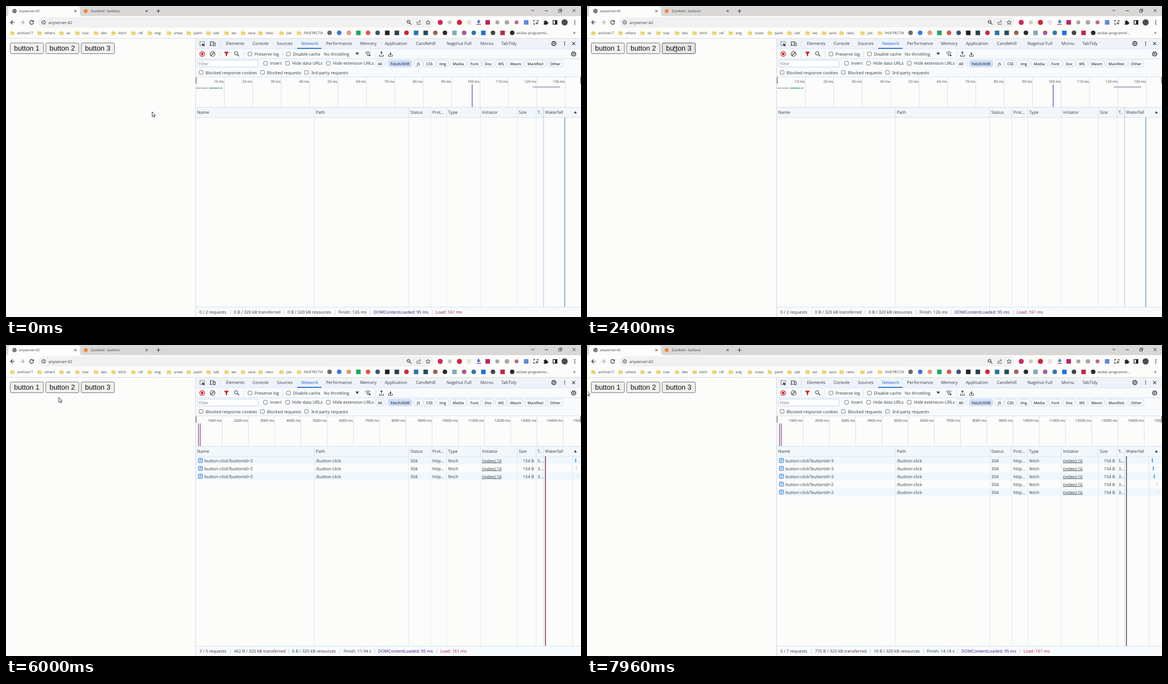
An HTML page for the animation above (8000 ms loop, 1017 px wide and 551 px high).

```html
<!DOCTYPE html>
<html lang="en">
<head>
<meta charset="utf-8">
<title>Network panel</title>
<style>
html, body { margin: 0; width: 100%; height: 100%; overflow: hidden; background: #fcfcfb; }
svg { display: block; width: 100%; height: 100%; }
text { font-family: "Open Sans", "Noto Sans", sans-serif; text-rendering: geometricPrecision; white-space: pre; }
.btn text { font-family: "Liberation Sans", Arial, sans-serif; }
.btn rect { fill: #efefed; stroke: #7b7b7b; animation: 8s step-end infinite; }
#b1 rect { animation-name: hover1; }
#b2 rect { animation-name: hover2; }
#b3 rect { animation-name: hover3; }
@keyframes hover1 { 98.1% { fill: #e4e4e2; stroke: #555; } 99.3% { fill: #efefed; stroke: #7b7b7b; } }
@keyframes hover2 { 76.4% { fill: #e4e4e2; stroke: #555; } 98% { fill: #efefed; stroke: #7b7b7b; } }
@keyframes hover3 { 28.9% { fill: #e4e4e2; stroke: #555; } 74.1% { fill: #efefed; stroke: #7b7b7b; } }

.stage { visibility: hidden; animation: 8s step-end infinite; }
#s0 { animation-name: show0; }
#s1 { animation-name: show1; }
#s2 { animation-name: show2; }
#s3 { animation-name: show3; }
#s4 { animation-name: show4; }
#s5 { animation-name: show5; }
@keyframes show0 { 0% { visibility: visible; } 53% { visibility: hidden; } }
@keyframes show1 { 53% { visibility: visible; } 59.25% { visibility: hidden; } }
@keyframes show2 { 59.25% { visibility: visible; } 65.5% { visibility: hidden; } }
@keyframes show3 { 65.5% { visibility: visible; } 86.25% { visibility: hidden; } }
@keyframes show4 { 86.25% { visibility: visible; } 93.25% { visibility: hidden; } }
@keyframes show5 { 93.25%, 100% { visibility: visible; } }

#cursor { animation: move 8s linear infinite; }
@keyframes move {
  0% { transform: translate(258px, 187px); }
  17.875% { transform: translate(258px, 187px); animation-timing-function: ease-in-out; }
  21.625% { transform: translate(197px, 134px); }
  24.125% { transform: translate(197px, 134px); animation-timing-function: ease-in-out; }
  30%, 72.875% { transform: translate(153.5px, 71.5px); }
  75% { transform: translate(93px, 92.5px); }
  77.875%, 97.5% { transform: translate(92px, 76.5px); }
  99.5%, 100% { transform: translate(-1px, 80.5px); }
}
</style>
</head>
<body>
<svg id="view" viewBox="0 0 1017 551"></svg>
<script>
const INK = '#3a3a3c', LINE = '#d3e2f5';

const rect = (x, y, w, h, fill, more = '') =>
  `<rect x="${x}" y="${y}" width="${w}" height="${h}" fill="${fill}" ${more}/>`;
const dot = (x, y, r, fill, more = '') =>
  `<circle cx="${x}" cy="${y}" r="${r}" fill="${fill}" ${more}/>`;
const path = (d, stroke = INK, w = 1, fill = 'none') =>
  `<path d="${d}" stroke="${stroke}" stroke-width="${w}" fill="${fill}"/>`;
const solid = (d, fill = INK) => `<path d="${d}" fill="${fill}"/>`;
const text = (x, y, str, size = 7.6, fill = INK, more = '') =>
  `<text x="${x}" y="${y}" font-size="${size}" fill="${fill}" ${more}>${str}</text>`;
const vline = (x, y1, y2, color = LINE, w = 1) => path(`M${x} ${y1}V${y2}`, color, w);
const hline = (y, x1, x2, color = LINE, w = 1) => path(`M${x1} ${y}H${x2}`, color, w);
const cross = (x, y, r, w = 1) =>
  path(`M${x - r} ${y - r}l${2 * r} ${2 * r}m0 ${-2 * r}l${-2 * r} ${2 * r}`, INK, w);
const ring = (x, y, r, color = INK, w = 1) => dot(x, y, r, 'none', `stroke="${color}" stroke-width="${w}"`);
const kebab = (x, y, step) => [-step, 0, step].map(d => dot(x, y + d, .9, INK)).join('');
const check = (x, y, label) =>
  rect(x - 3.3, y - 3.3, 6.6, 6.6, '#fff', 'rx="1.2" stroke="#6b6b6e" stroke-width=".9"') +
  text(x + 8, y + 2.8, label);
const gear = (x, y) => ring(x, y, 3.2, INK, 1.2) + dot(x, y, 1.2, INK) +
  dot(x, y, 4.2, 'none', `stroke="${INK}" stroke-width="1.1" stroke-dasharray="1.6 1.7"`);
const lens = (x, y, r) => ring(x - 1, y - 1, r) + path(`M${x + r - 1.6} ${y + r - 1.6}l2.8 2.8`, INK, 1.2);
const arrowBox = (x, y, up) =>
  path(`M${x} ${y + 2}v-5.5M${x - 3.5} ${y + 1.5}v2.5h7v-2.5`) +
  solid(up ? `M${x - 2.3} ${y - 2}l2.3-2.8 2.3 2.8z` : `M${x - 2.3} ${y - .4}l2.3 2.8 2.3-2.8z`);

function tabStrip() {
  const title = (x, label) => text(x, 11.3, label, 6.1);
  return rect(0, 0, 1017, 18, '#dad8d6') +
    solid('M0 18q4 0 4-4V5q0-4 4-4H127q4 0 4 4V14q0 4 4 4z', '#fcfcfb') +
    dot(15, 9, 3.7, '#5b5d60') + path('M12 8h3l1 2h2M14 12v-2', '#d8d8d8', .8) +
    title(23, 'anyserver:42') + cross(122.7, 9, 2) +
    dot(141, 9, 3.6, '#ee8a3c') + title(150, 'Zumbrel - buttons') + cross(248.7, 9, 2) +
    path('M266.3 9h6.6M269.6 5.7v6.6', INK, 1.1) +
    path('M929 6.5l2.7 2.7 2.7-2.7') + hline(8.5, 953, 958.5, INK) +
    path('M977.5 7h4v4h-4zM979 7V5.5h4V9.5h-1.5', INK, .9) + cross(1004.7, 8, 2.6);
}

function addressBar() {
  const logos = [[768, '#d6245a', 4.5], [785, '#c9cdc4', 3.5], [802, '#cf2432', 4.5], [869, '#a3a69b', 3.5],
    [886, '#a9a9a4', 4], [903, '#b56a92', 3.5], [988, '#4c4c4e', 5.5]];
  const squares = [[819, '#e9e6e0'], [852, '#bd2560'], [920, '#5a8be6']];
  return path('M15.5 29H8.5M11.8 25.5L8.3 29l3.5 3.5', INK, 1.2) +
    path('M25 29h7M28.7 25.5l3.5 3.5-3.5 3.5', '#a9a9a9', 1.1) +
    path('M47.6 26.6a3.4 3.4 0 1 0 1 3', INK, 1.2) + solid('M49.3 25v3.6h-3.6z') +
    rect(57, 20, 699, 18, '#f0f1f0', 'rx="9"') +
    ring(66.6, 29, 3.2) + path('M66.6 28.5v2.2M66.6 26.8v.9') +
    text(75, 31.7, 'anyserver:42', 7) +
    lens(713, 29, 2.7) + path('M710.5 28h3', INK, .8) +
    path('M727 27.5v5h6v-2M728.5 30.5q.5-3.5 4-3.5M731 25l2.3 2-2.3 2', '#5d5d60', .9) +
    path('M746.6 25.3l1.1 2.5 2.7.3-2 1.8.6 2.7-2.4-1.4-2.4 1.4.6-2.7-2-1.8 2.7-.3z', INK, .9) +
    logos.map(([x, c, r]) => dot(x, 29, r, c)).join('') +
    squares.map(([x, c]) => rect(x - 4, 25, 8, 8, c)).join('') +
    solid('M834.6 24.5h2.8v3h2.3l-3.7 3.6-3.7-3.6h2.3z', '#2c6fd6') + hline(32.5, 832, 840, '#d0394a', 1.3) +
    path('M933.5 28v-2.5h2.5M938.5 25.5h2.5V28M933.5 30v2.5h2.5', INK, 1.1) + path('M939 28v5M936.5 30.5h5', INK, 1.1) +
    solid('M951 27h2v-.6a1.2 1.2 0 0 1 2.4 0V27h2v2h.6a1.2 1.2 0 0 1 0 2.4h-.6V33h-6.4v-2a1.2 1.2 0 0 0 0-2.4z', '#222') +
    rect(967.5, 25.7, 7, 6.6, 'none', 'stroke="#222" stroke-width="1.2"') + rect(971, 25.7, 3.5, 6.6, '#222') +
    kebab(1006, 29, 3);
}

function bookmarks() {
  const folders = [[20, 'archive17'], [68, 'others'], [107, 'se'], [135, 'trav'], [168, 'dev'], [199, 'kitch'],
    [234, 'ref'], [263, 'eng'], [297, 'snow'], [332, 'paint'], [367, 'tatt'], [399, 'wo'], [428, 'хата'],
    [459, 'reloc'], [496, 'job'], [527, 'РАЗГРЕСТИ']];
  const round = { 0: '#6a6a6a', 1: '#3b78de', 2: '#e39a76', 4: '#dd5648', 5: '#36546d', 8: '#c9243d', 11: '#9b6259',
    12: '#2b2b2d', 14: '#a85c90', 15: '#3574b0', 17: '#444', 19: '#2b2b2d' };
  const square = { 3: '#1ca566', 6: '#1f1f20', 7: '#23434a', 9: '#2374b4', 10: '#214d58', 13: '#7fabb6',
    16: '#2470dc', 18: '#bd2947' };
  let out = folders.map(([x, label]) =>
    solid(`M${x - 12} 44.6h2.6l.8.9h3.2v5.3h-6.6z`, '#f4d673') +
    path(`M${x - 12} 46.5h6.6v4.3h-6.6z`, '#e3bb49', .6) + text(x, 49.8, label, 6.2)).join('');
  for (let i = 0; i < 20; i++) {
    const x = 572.3 + 17 * i;
    out += round[i] ? dot(x, 47.6, 4, round[i]) : rect(x - 4, 43.6, 8, 8, square[i]);
  }
  return out + text(903, 49.8, 'wicker-programmi...', 6.2) + text(1003, 50, '»', 9) + hline(57.5, 0, 1017, '#dededb');
}

function toolTabs() {
  const tabs = [[389, 'Elements'], [436, 'Console'], [479, 'Sources'], [522, 'Network'], [566, 'Performance'],
    [626, 'Memory'], [670, 'Application'], [725, 'Candlehill'], [779, 'Nagshut Full'], [839, 'Morvu'], [876, 'TabTidy']];
  return rect(336, 58, 681, 18, '#eef3f9') + hline(76, 336, 1017) +
    rect(343, 63, 8, 7, 'none', `stroke="${INK}" stroke-dasharray="1.4 1"`) + solid('M346.5 66l5 2-2 .8 2 2-1 1-2-2-.8 1.6z') +
    path('M361.5 69.5V63.5h7M360 69.8h5M366.5 65.5h3.5v4.8h-3.5z', INK, 1.1) + vline(379, 61, 73) +
    tabs.map(([x, label]) => text(x, 69.4, label, 7.6, label === 'Network' ? '#1c63cf' : INK)).join('') +
    rect(515, 74.2, 43, 1.8, '#2a6fd8') +
    gear(969, 66.5) + kebab(988, 66.5, 2.8) + cross(1004, 66.5, 2.6, 1.1);
}

function toolRow() {
  return rect(336, 76.5, 681, 49, '#f8fafc') + hline(93.5, 336, 1017) +
    ring(347, 85, 4.2, '#c9252d', 1.2) + rect(345, 83, 4, 4, '#c9252d') +
    ring(365.3, 85, 4.2, INK, 1.1) + path('M362.3 88l6-6', INK, 1.1) + vline(379, 79, 91) +
    solid('M385.6 81h8.6l-3.2 4.2V89.6l-2.2-1.6v-2.8z', '#c9252d') + lens(408, 84.8, 3) + vline(421, 79, 91) +
    check(431.5, 85, 'Preserve log') + vline(489, 79, 91) + check(499.5, 85, 'Disable cache') +
    text(562, 87.8, 'No throttling') + solid('M618 82.6h6.4l-3.2 4.2z') +
    path('M635 83.2q4.8-4 9.6 0M636.8 85.2q3-2.4 6 0') + dot(639.6, 87, 1, INK) + gear(642.5, 87.2).slice(0, 0) +
    dot(643, 87.5, 1.5, INK) + vline(654, 79, 91) +
    arrowBox(664, 85, true) + arrowBox(680, 85, false) + gear(1004, 85);
}

function filterRow() {
  const pills = [[654, 669, 'All'], [676, 718, 'Fetch/XHR'], [722, 737, 'JS'], [739, 759, 'CSS'], [762, 783, 'Img'],
    [786, 814, 'Media'], [817, 840, 'Font'], [843, 863, 'Doc'], [866, 885, 'WS'], [888, 915, 'Wasm'],
    [918, 955, 'Manifest'], [958, 985, 'Other']];
  return rect(338.5, 96, 107.5, 12, '#fff', 'rx="2" stroke="#c8d6e8"') + text(341, 104.8, 'Filter', 7.4, '#77777a') +
    check(459, 101.5, 'Invert') + check(498, 101.5, 'Hide data URLs') + check(570, 101.5, 'Hide extension URLs') +
    vline(672.5, 96, 108) +
    pills.map(([a, b, label], i) =>
      rect(a, 96, b - a, 12, i === 1 ? '#cbdff8' : '#fbfcfd', `rx="3.5" stroke="${i === 1 ? '#cbdff8' : '#c5d5e8'}" stroke-width=".9"`) +
      text((a + b) / 2, 104.6, label, 6.7, INK, 'font-weight="600" text-anchor="middle"')).join('') +
    check(345, 117.7, 'Blocked response cookies') + check(453.5, 117.7, 'Blocked requests') +
    check(531.5, 117.7, '3rd-party requests') + hline(125.5, 336, 1017);
}

const COLS = [[338, 'Name'], [548, 'Path'], [715, 'Status'], [754, 'Prot...'], [782, 'Type'], [842, 'Initiator'],
  [907, 'Size'], [940, 'T..'], [953.5, 'Waterfall']];

function tableFrame() {
  return rect(336, 180, 681, 17, '#f2f7fb') + hline(179.5, 336, 1017) + hline(197.5, 336, 1017) +
    COLS.map(([x, label]) => text(x, 191.2, label, 7.6)).join('') + solid('M1004.4 190.3h5.2l-2.6-4z') +
    rect(336, 534, 681, 17, '#f8fafc') + hline(533.5, 336, 1017) + vline(335.5, 58, 551, '#d6d9dd');
}

const DONE = [10.94, 11.44, 11.94, 13.6, 14.18];  // finish time of each request, s

function ruler(n) {
  const step = n === 0 ? 50.25 : n < 3 ? 57.95 : 46.4;
  let out = '';
  for (let i = 1; i < 16 && 336 + step * (i - 1) < 1000; i++) {
    const x = 336 + step * i;
    out += vline(x, 126, 179) + text(x - 1, 135.6, `${i * (n ? 1000 : 10)} ms`, 6.2, INK, 'text-anchor="end"');
  }
  out += rect(335.6, 126, 1.6, 11.5, '#85878b') + rect(1015.6, 126, 1.4, 11.5, '#85878b');
  if (!n) {
    return out + hline(145.5, 336, 344, '#98a0a4', 1.5) + hline(145.5, 345, 357, '#9ba58c', 1.5) +
      hline(145.5, 359, 377, '#46b083', 1.6) + hline(145.5, 378, 383, '#4fa7a5', 1.5) +
      vline(824.5, 139, 179, '#6863bd', 1.4) + hline(143.5, 931.5, 980, '#9492b4', 1.5);
  }
  const ticks = DONE.slice(0, n).map(s => vline(336 + s * step, 146, 149.5, '#d5e6ea')).join('');
  return out + ticks + vline(336 + .095 * step, 139, 179, '#6a5aa6', 1.2) + vline(336 + .161 * step, 139, 179, '#93415f', 1.2);
}

function rows(n) {
  let back = '', front = '';
  for (let i = 0; i < n; i++) {
    const y = 204.7 + 14 * i, base = y + 2.8;
    if (i % 2 === 0) back += rect(336, y - 7, 681, 14, '#f1f8fd');
    const cells = [`button-click?buttonId=${i < 3 ? 3 : 2}`, '/button-click', '304', 'http...', 'fetch'];
    front += rect(340.4, y - 3.6, 7, 7.2, '#fff', 'rx="1" stroke="#3b7ddd" stroke-width="1.1"') +
      path(`M342 ${y - 1.5}h4m-4 1.7h4m-4 1.7h2.6`, '#3b7ddd', .8) +
      cells.map((c, k) => text(k ? COLS[k][0] : 351, base, c, 7.7)).join('') +
      text(842, base, '(index):16', 7.6, INK, 'text-decoration="underline"') +
      text(934, base, '154 B', 7.6, INK, 'text-anchor="end"') + text(940, base, i ? '3...' : '5...');
    const age = DONE[n - 1] - DONE[i], x = 1011 - 3.4 * age;
    front += vline(x - 2.3, y - 1.5, y + 1.5, '#cddde2') +
      (age > .8 ? vline(x, y - 3.6, y + 3.6, '#36abd9', 1.8)
        : vline(x, y - (age ? 3.4 : 1.5), y + (age ? 3.4 : 1.5), '#a9d3df'));
  }
  const grid = [545.5, 712.5, 751, 779.5, 839, 904.5, 937.5].map(x =>
    vline(x, 180, 197) + vline(x, 197, 533, '#dfe8f0', .9)).join('');
  const marks = n === 0
    ? vline(950.8, 180, 533, '#b2d2f1', 1.2) + vline(988.3, 197, 533, '#74a5bd', 1.5)
    : vline(951, 180, 533, '#d0dfef') + vline(n < 3 ? 1004 : n < 4 ? 1002 : 994, 197, 533, '#d5e6f2') +
      vline(954.2, 197, 533, n < 5 ? '#7b3a61' : '#5d4766', 1.5);
  return back + grid + marks + front;
}

function status(n) {
  const finish = n ? DONE[n - 1].toFixed(2) + ' s' : '126 ms';
  const xs = n === 0 ? [342, 403, 498, 588, 650, 760]
    : n < 5 ? [342, 403, 506, 597, 658, 768] : [342, 403, 507, 601, 662, 772];
  const parts = [`${n} / ${n + 2} requests`, `${154 * n} B / 320 kB transferred`, `${2 * n} B / 320 kB resources`,
    `Finish: ${finish}`, 'DOMContentLoaded: 95 ms', 'Load: 161 ms'];
  const colors = { 4: '#35207f', 5: n ? '#b0203c' : '#85204f' };
  return parts.map((p, i) => (i ? vline(xs[i] - 6, 538, 547, '#ccd6e2') : '') +
    text(xs[i], 545.4, p, 7.5, colors[i] || INK)).join('');
}

const stage = n => `<g class="stage" id="s${n}">${ruler(n)}${rows(n)}${status(n)}</g>`;
const button = (i, x) => `<g class="btn" id="b${i}"><rect x="${x}" y="65.5" width="58.7" height="19" rx="2"/>` +
  text(x + 29.2, 79.2, `button ${i}`, 12.4, '#111', 'text-anchor="middle"') + '</g>';

document.getElementById('view').innerHTML =
  rect(0, 0, 1017, 551, '#fcfcfb') + tabStrip() + addressBar() + bookmarks() +
  toolTabs() + toolRow() + filterRow() + tableFrame() +
  [0, 1, 2, 3, 4, 5].map(stage).join('') +
  button(1, 7.5) + button(2, 70.2) + button(3, 133) +
  '<g id="cursor">' + path('M.5 .5V9L2.5 7.3 3.9 10.3 5.3 9.6 4 6.8H6.4Z', '#333', .9, '#fff') + '</g>';
</script>
</body>
</html>
```
